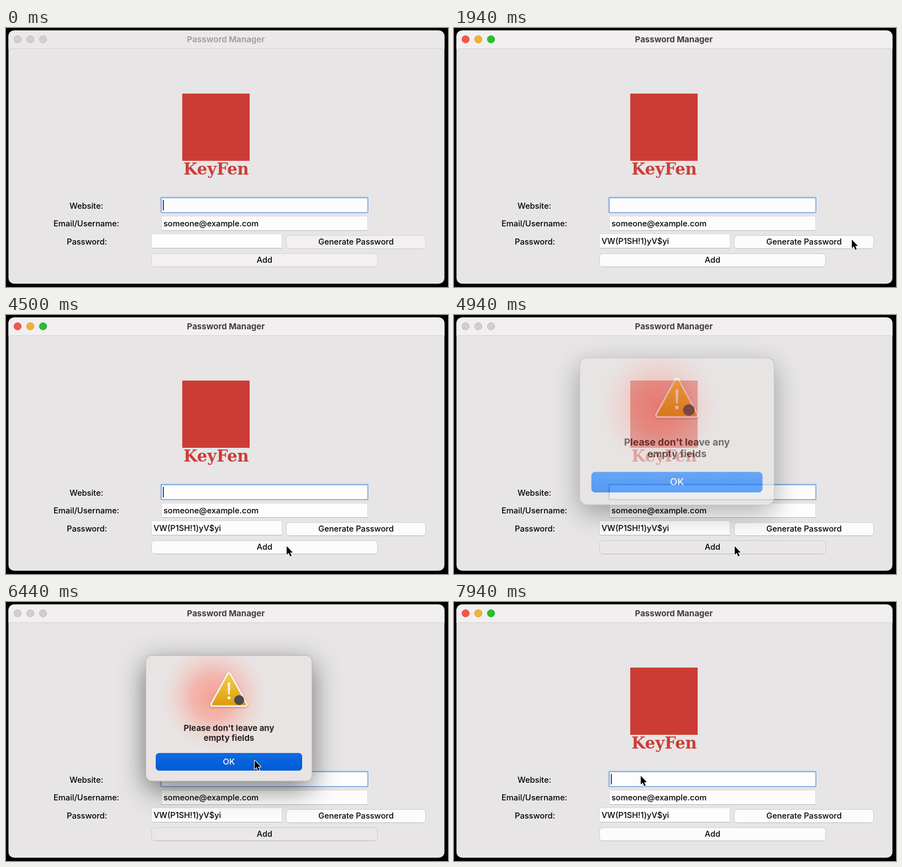
These frames come from a looping animation (800 by 470 pixels, 8 s). An HTML page with a canvas:

```html
<!DOCTYPE html>
<html lang="en">
<head>
<meta charset="utf-8">
<title>Password Manager</title>
<style>
  html, body { margin: 0; width: 100%; height: 100%; overflow: hidden; background: #000; }
  canvas { display: block; }
</style>
</head>
<body>
<canvas id="stage" width="800" height="470"></canvas>
<script>
const W = 800, H = 470, LOOP = 8000;
const stage = document.getElementById('stage').getContext('2d');
const layer = document.createElement('canvas');
layer.width = W;
layer.height = H;
const sheet = layer.getContext('2d');

const UI = 'Inter, sans-serif';
const RED = '#cd3c34';

// Moments in the story, in ms
const T = {
  activate: 1700, press: 1750, fill: 1900,
  add: 4700, open: 4880, opened: 5100,
  ok: 6430, close: 6600, closed: 6740, back: 7750
};

// Pointer moves: start, end, target x and y, sideways bend
const MOVES = [
  [250, 1050, 720, 384, 0],
  [3600, 4450, 508, 419.5, 25],
  [5850, 6350, 450, 287.5, 0],
  [7150, 7600, 338, 315.5, 0]
];

const between = (t, a, b) => t >= a && t < b;
const progress = (t, a, b) => Math.min(1, Math.max(0, (t - a) / (b - a)));
const smooth = p => p * p * (3 - 2 * p);

function box(c, x, y, w, h, r, fill, line) {
  c.beginPath();
  c.roundRect(x, y, w, h, r);
  if (fill) {
    c.fillStyle = fill;
    c.fill();
  }
  if (line) {
    c.strokeStyle = line;
    c.lineWidth = 1;
    c.stroke();
  }
}

function dot(c, x, y, r, fill, line) {
  box(c, x - r, y - r, 2 * r, 2 * r, r, fill, line);
}

function label(c, str, x, y, align = 'left', color = '#000', font = `500 14.6px ${UI}`) {
  c.font = font;
  c.textAlign = align;
  c.fillStyle = color;
  c.fillText(str, x, y);
}

function drawWindow(c, active, titled) {
  box(c, 4.5, 4.5, 789, 459.5, 10, '#e7e5e6');
  box(c, 4.5, 4.5, 789, 33.5, [10, 10, 0, 0], titled ? '#f1efef' : '#eae8e9');
  c.fillStyle = '#d3d1d2';
  c.fillRect(4.5, 37, 789, 1);
  const lights = active
    ? [['#f5554d', '#dc4840'], ['#f2b233', '#d99c26'], ['#27c031', '#1fa628']]
    : Array(3).fill(['#d0cecf', '#bfbdbe']);
  lights.forEach(([fill, line], i) => dot(c, 21 + 23 * i, 20.5, 6.6, fill, line));
  label(c, 'Password Manager', 398, 25.5, 'center', titled ? '#403e3f' : '#a4a2a3',
    `bold 15px ${UI}`);
}

function drawLogo(c) {
  c.fillStyle = RED;
  c.fillRect(319, 119, 122, 122);
  label(c, 'KeyFen', 380.5, 266, 'center', RED, 'bold 29px "DejaVu Serif", serif');
}

function drawField(c, x, y, w, h, str) {
  box(c, x, y, w, h, 0, '#fdfdfd', '#dddbdc');
  c.fillStyle = '#b9b7b8';
  c.fillRect(x, y + h - 0.5, w, 1);
  label(c, str, x + 3.5, y + 18.5);
}

function drawButton(c, str, x, y, w, h, lit, pressed) {
  const fill = pressed ? '#e9e7e8' : lit ? '#fdfcfd' : '#f2f0f1';
  box(c, x, y, w, h, 5.5, fill, lit ? '#cecccd' : '#d8d6d7');
  c.fillStyle = lit ? '#b9b7b8' : '#cbc9ca';
  c.fillRect(x + 5, y + h - 0.5, w - 10, 1);
  label(c, str, x + w / 2, y + 16.5, 'center');
}

function drawForm(c, t, lit) {
  label(c, 'Website:', 145.5, 328, 'center');
  label(c, 'Email/Username:', 145.5, 360, 'center');
  label(c, 'Password:', 146.5, 393, 'center');

  box(c, 279.5, 306.5, 376.5, 29.5, 2, '#8bb2e6');
  box(c, 282, 309, 372, 25, 0, '#fdfdfd');
  if (caretOn(t)) {
    c.fillStyle = '#000';
    c.fillRect(284, 312, 1.4, 19);
  }

  drawField(c, 281.5, 341.5, 373, 26, 'someone@example.com');
  drawField(c, 263.5, 373.5, 236, 26, t >= T.fill ? 'VW(P1SH!1)yV$yi' : '');
  drawButton(c, 'Generate Password', 507.5, 376.5, 252, 24, lit, between(t, T.press, T.fill));
  drawButton(c, 'Add', 263.5, 409.5, 409, 24, lit, between(t, T.add, T.close));
}

function caretOn(t) {
  if (t < T.open) return !between(t % 900, 60, 360);
  return t >= T.close && (t - T.close - 100) % 900 < 600;
}

function drawWarning(c) {
  const paint = c.createLinearGradient(0, 130, 0, 190);
  paint.addColorStop(0, '#f6cf45');
  paint.addColorStop(0.55, '#e9b125');
  paint.addColorStop(1, '#dc980f');
  const sign = new Path2D('M403.5 132 L374 186 H433 Z');
  c.save();
  c.lineJoin = 'round';
  c.shadowColor = 'rgba(0,0,0,.35)';
  c.shadowBlur = 3;
  c.shadowOffsetY = 1;
  c.strokeStyle = '#f5f3ef';
  c.lineWidth = 9;
  c.stroke(sign);
  c.restore();
  c.save();
  c.lineJoin = 'round';
  c.strokeStyle = c.fillStyle = paint;
  c.lineWidth = 3;
  c.stroke(sign);
  c.fill(sign);
  c.restore();

  c.fillStyle = '#fbf8ee';
  c.fill(new Path2D('M401 147.5 Q403.5 143.5 406 147.5 L404.9 167 Q403.5 169 402.1 167 Z'));
  dot(c, 403.5, 174, 2.8, '#fbf8ee');
  dot(c, 422, 178, 9, '#484b50');
}

function drawDialog(c, pressed) {
  c.save();
  c.shadowColor = 'rgba(0,0,0,.52)';
  c.shadowBlur = 48;
  c.shadowOffsetY = 14;
  box(c, 253, 97, 301, 228, 11, '#e8e4e3');
  c.restore();

  const glow = c.createRadialGradient(376, 172, 0, 376, 172, 102);
  glow.addColorStop(0, 'rgba(247,158,147,1)');
  glow.addColorStop(0.4, 'rgba(245,172,162,.8)');
  glow.addColorStop(0.75, 'rgba(240,205,199,.45)');
  glow.addColorStop(1, 'rgba(232,228,227,0)');
  box(c, 253, 97, 301, 228, 11, glow, '#b5b1b0');

  drawWarning(c);
  const bold = `bold 15px ${UI}`;
  label(c, "Please don't leave any", 403.5, 233.6, 'center', '#2b2423', bold);
  label(c, 'empty fields', 403.5, 251.6, 'center', '#2b2423', bold);

  const blue = c.createLinearGradient(0, 274, 0, 306);
  blue.addColorStop(0, pressed ? '#0d6be0' : '#1a80ff');
  blue.addColorStop(1, pressed ? '#005bd6' : '#006bfa');
  box(c, 271, 274, 265, 32, 6, blue);
  label(c, 'OK', 403.5, 295, 'center', '#fff', `500 15px ${UI}`);
}

// The alert shrinks into place while it fades in
function showDialog(t) {
  const shown = 1 - (1 - progress(t, T.open, T.opened)) ** 3;
  const scale = 1 + 0.448 * (1 - shown);
  sheet.setTransform(1, 0, 0, 1, 0, 0);
  sheet.clearRect(0, 0, W, H);
  sheet.translate(403.5, 211);
  sheet.scale(scale, scale);
  sheet.translate(-403.5, -211);
  drawDialog(sheet, t >= T.ok);
  stage.globalAlpha = shown * (1 - progress(t, T.close, T.closed));
  stage.drawImage(layer, 0, 0);
  stage.globalAlpha = 1;
}

function pointerAt(t) {
  let x = 739, y = 482;
  for (const [from, to, tx, ty, bend] of MOVES) {
    const p = smooth(progress(t, from, to));
    x += (tx - x) * p;
    y += (ty - y) * p + bend * Math.sin(Math.PI * p);
  }
  return [x, y];
}

const ARROW = new Path2D('M0 0 V15.6 L3.6 12.3 L6.3 18.6 L8.9 17.5 L6.2 11.4 H11 Z');

function drawPointer(c, t) {
  c.save();
  c.translate(...pointerAt(t));
  c.strokeStyle = '#fff';
  c.lineWidth = 2;
  c.lineJoin = 'round';
  c.stroke(ARROW);
  c.fillStyle = '#000';
  c.fill(ARROW);
  c.restore();
}

function draw() {
  const t = performance.now() % LOOP;
  const active = between(t, T.activate, T.open - 30) || t >= T.back;
  const lit = between(t, T.activate, T.close) || t >= T.back;
  stage.fillStyle = '#000';
  stage.fillRect(0, 0, W, H);
  drawWindow(stage, active, t >= T.activate);
  drawLogo(stage);
  drawForm(stage, t, lit);
  if (between(t, T.open, T.closed)) showDialog(t);
  drawPointer(stage, t);
  requestAnimationFrame(draw);
}
draw();
</script>
</body>
</html>
```
